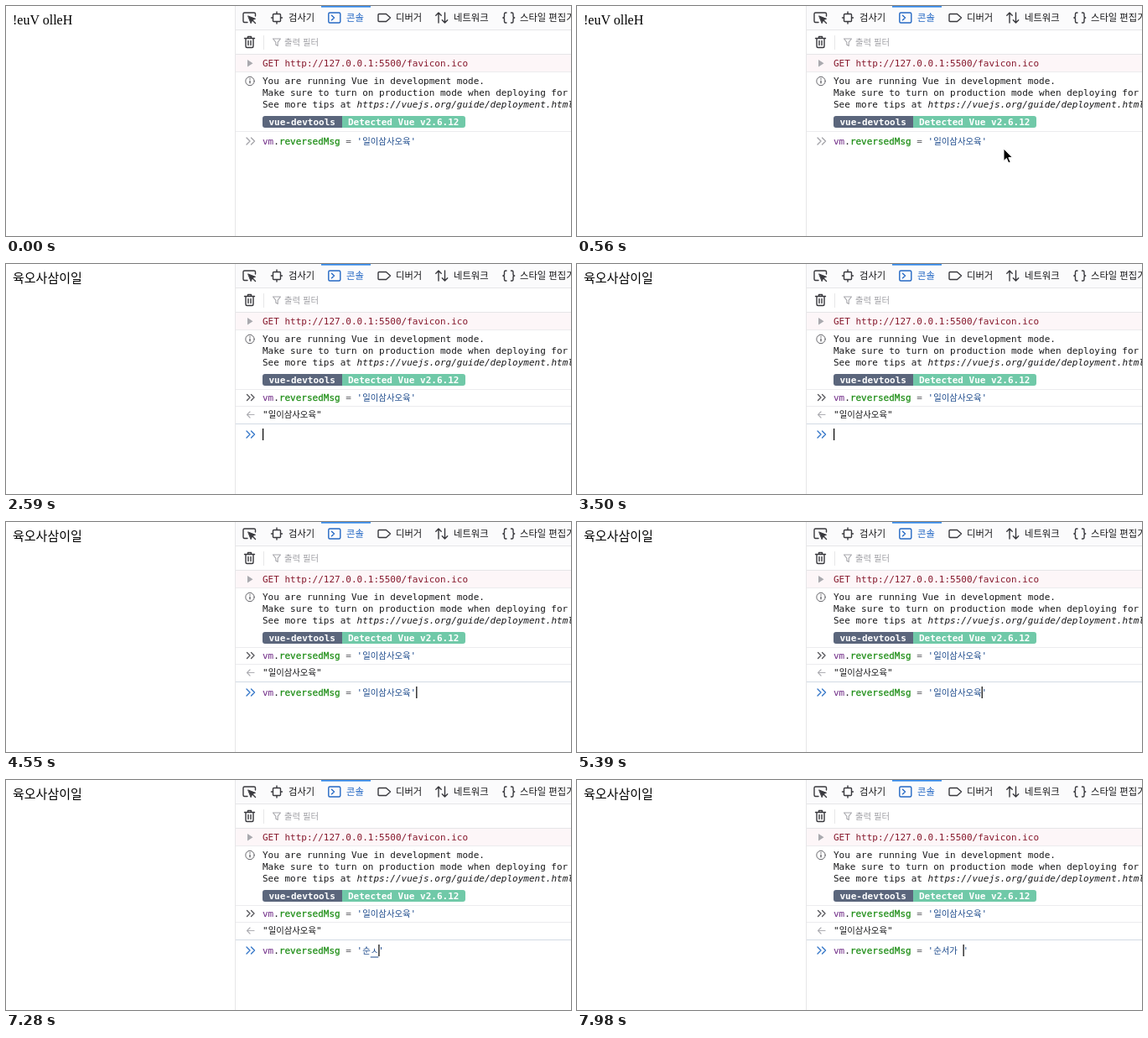
These frames come from a looping animation (674x274 px, 8000 ms). An HTML page:

```html
<!DOCTYPE html>
<html lang="ko">
<head>
<meta charset="utf-8">
<title>Console</title>
<style>
  html, body { margin: 0; width: 100%; height: 100%; overflow: hidden; background: #fff; }
  svg { display: block; width: 674px; height: 274px; }
  text { white-space: pre; }
  .mono { font: 11px "DejaVu Sans Mono", monospace; fill: #18181a; }
  .ko { font-family: "Noto Sans CJK KR", "Noto Sans CJK JP", "Noto Sans CJK", sans-serif; }
  .tab { font-size: 11.3px; fill: #18181a; }
  .mono .ko { font-size: 10.4px; }
  .badge { font-weight: bold; fill: #fff; }
  .var { fill: #6f2a86; }
  .prop { fill: #23901b; stroke: #23901b; stroke-width: .3px; }
  .op { fill: #5c5c61; }
  .str { fill: #1c4a8c; }
  .icon { fill: none; stroke: #38383d; stroke-width: 1.4; stroke-linejoin: round; stroke-linecap: round; }
  .rule { stroke: #e6e6e8; stroke-width: 1; }
</style>
</head>
<body>
<svg viewBox="0 0 674 274">
  <rect width="674" height="274" fill="#fff"/>
  <text id="page" x="8" y="22"></text>

  <rect x="274" width="400" height="28" fill="#fbfbfc"/>
  <rect x="274" y="58" width="400" height="20" fill="#fdf6f8"/>
  <path class="rule" d="M273.5 0V274M274 28.5H674M274 57.5H674M307.5 35V52"/>
  <path class="rule" stroke-opacity=".75" d="M274 78.5H674M274 149.5H674"/>
  <rect x="376" width="59" height="1.6" fill="#2f86ea"/>

  <g class="icon">
    <path d="M288 19.5H284.5Q283 19.5 283 18V9.500Q283 8 284.500 8H296Q297.500 8 297.500 9.500V12"/>
    <path d="M289 12L297.500 15.300L293.800 16.600L292.300 20.300Z" fill="#38383d" stroke-width="1"/>
    <path d="M294 17L297.500 20.500"/>
    <rect x="318.500" y="9.500" width="9" height="9" rx="1"/>
    <path d="M323 7V9M323 19V21M316.500 14H318M328 14H329.500"/>
    <g stroke="#2468c4">
      <rect x="384.800" y="8" width="14" height="12" rx="1.500"/>
      <path d="M388.500 11.300L391.500 14L388.500 16.700"/>
    </g>
    <path d="M445 9.500H453.500L458.500 14L453.500 18.500H445Q444 18.500 444 17.500V10.500Q444 9.500 445 9.500Z"/>
    <path d="M516 20V8M512.800 11.200L516 8L519.200 11.200M523.500 8V20M520.300 16.800L523.500 20L526.700 16.800"/>
    <path d="M597 8H596Q594.500 8 594.500 9.500V12Q594.500 14 592.800 14Q594.500 14 594.500 16V18.500Q594.500 20 596 20H597M602.500 8H603.500Q605 8 605 9.500V12Q605 14 606.700 14Q605 14 605 16V18.500Q605 20 603.500 20H602.500"/>
    <path d="M284.500 38.500H296.500M288.500 38V36.500H292.500V38M286 39V48Q286 49.500 287.500 49.500H293.500Q295 49.500 295 48V39M289 41.500V46.500M292 41.500V46.500"/>
    <path d="M318.500 39H327.500L324.200 43.200V47.500L321.800 46V43.200Z" stroke="#a8a8ad" stroke-width="1.100"/>
  </g>

  <g class="ko tab">
    <text x="337" y="17.500">검사기</text>
    <text x="406" y="17.500" style="fill:#2468c4">콘솔</text>
    <text x="465" y="17.500">디버거</text>
    <text x="534" y="17.500">네트워크</text>
    <text x="613" y="17.500">스타일 편집기</text>
    <text x="332" y="47" style="font-size:10.400px;fill:#a2a2a7">출력 필터</text>
  </g>

  <path d="M288 64L294.500 68.300L288 72.500Z" fill="#a9a9ae"/>
  <circle class="icon" cx="291" cy="89.500" r="5.200" style="stroke-width:1;stroke:#66666b"/>
  <path d="M291 88.800V92.300M291 86.300V87.500" stroke="#55555a" stroke-width="1.300"/>

  <g class="mono">
    <text x="306" y="72" style="fill:#86182c">GET http://127.0.0.1:5500/favicon.ico</text>
    <text x="306" y="93">You are running Vue in development mode.</text>
    <text x="306" y="107">Make sure to turn on production mode when deploying for production.</text>
    <text x="306" y="121">See more tips at <tspan font-style="italic">https://vuejs.org/guide/deployment.html</tspan></text>
    <path d="M401 131H309Q306 131 306 134V142Q306 145 309 145H401Z" fill="#5b667c"/>
    <path d="M401 131H545Q548 131 548 134V142Q548 145 545 145H401Z" fill="#70c9a8"/>
    <text class="badge" x="313.500" y="142">vue-devtools</text>
    <text class="badge" x="408" y="142">Detected Vue v2.6.12</text>
  </g>

  <g id="result" class="mono">
    <path class="rule" stroke-opacity=".75" d="M274 169.500H674"/>
    <path class="rule" d="M274 190.500H674" style="stroke:#d3dbe4"/>
    <path class="icon" d="M287.500 155.500L291 159L287.500 162.500M292.500 155.500L296 159L292.500 162.500" style="stroke:#55555a"/>
    <text id="echo" x="306" y="163"></text>
    <path class="icon" d="M296 179.500H287.500M291 176L287.500 179.500L291 183" style="stroke:#aeaeb3;stroke-width:1.200"/>
    <text x="306" y="183">"<tspan class="ko">일이삼사오육</tspan>"</text>
  </g>

  <g id="prompt" class="mono">
    <path id="chevron" class="icon" d="M287 -8L291 -4L287 0M292.500 -8L296.500 -4L292.500 0"/>
    <text id="input" x="306" y="0"></text>
    <path id="underline" stroke="#1c4a8c" stroke-width="1"/>
    <rect id="caret" y="-11" width="1.200" height="14" fill="#000"/>
  </g>

  <path id="mouse" d="M0 0V14.500L3.400 11.400L5.800 17L8.200 16L5.800 10.600H10.400Z" fill="#000" stroke="#fff" stroke-width="1"/>
</svg>
<script>
const LOOP = 8000, CLICK = 950, HIDE = 1650, ENTER = 2310, BLINK = 500;
const WORD = '일이삼사오육';
const MONO = 6.622, KO = 9.57, LEFT = 306;
const $ = id => document.getElementById(id);

// Each edit: time, string body (null for an empty line), caret after closing quote, composing
const edits = [
  [0, WORD, true], [CLICK, WORD, true], [ENTER, null], [4550, WORD, true], [5180, WORD]
];
for (let i = 1; i <= 6; i++) edits.push([5700 + i * 110, WORD.slice(0, 6 - i)]);
['ㅅ', '수', '순', '순ㅅ', '순서', '순서ㄱ', '순서가'].forEach((s, i) =>
  edits.push([6720 + i * 155, s, false, true]));
edits.push([7840, '순서가 ']);

const code = body => body === null ? '' :
  '<tspan class="var">vm</tspan>.<tspan class="prop">reversedMsg</tspan>' +
  '<tspan class="op"> = </tspan><tspan class="str">\'<tspan class="ko">' + body.trim() +
  '</tspan>' + (body.endsWith(' ') ? ' ' : '') + "'</tspan>";

const widthOf = body => [...body].reduce((w, c) => w + (c === ' ' ? MONO : KO), 0);

const show = (id, on) => $(id).setAttribute('visibility', on ? 'visible' : 'hidden');

function setPage(text, size, family) {
  const el = $('page');
  if (el.textContent === text) return;
  el.textContent = text;
  el.style.font = size + 'px ' + family;
}

let shown = null;
function drawPrompt(t) {
  const edit = edits.filter(e => e[0] <= t).pop();
  const [at, body, atEnd, composing] = edit;
  if (shown !== edit) {
    shown = edit;
    $('input').innerHTML = code(body);
  }
  const end = body === null ? LEFT : LEFT + 18 * MONO + widthOf(body);
  $('caret').setAttribute('x', end + (atEnd ? MONO : 0));
  show('caret', t >= CLICK && Math.floor((t - at) / BLINK) % 2 === 0);
  $('underline').setAttribute('d', composing ? `M${end - KO} 4H${end}` : '');
  $('chevron').style.stroke = t < CLICK ? '#a5a5aa' : '#3577c9';
  $('prompt').setAttribute('transform', `translate(0 ${t < ENTER ? 165 : 207})`);
}

function drawMouse(t) {
  show('mouse', t >= 70 && t < HIDE);
  const left = Math.pow(1 - Math.min(1, Math.max(0, (t - 70) / 490)), 2);
  $('mouse').setAttribute('transform', `translate(${509 + 161 * left} ${170 + 75 * left})`);
}

function draw(now) {
  const t = now % LOOP;
  if (t < ENTER) setPage('!euV olleH', 16, '"Liberation Serif", serif');
  else setPage('육오사삼이일', 15, '"Noto Sans CJK KR", "Noto Sans CJK JP", "Noto Sans CJK", sans-serif');
  show('result', t >= ENTER);
  drawPrompt(t);
  drawMouse(t);
}

$('echo').innerHTML = code(WORD);
const start = performance.now();
function tick() {
  draw(performance.now() - start);
  requestAnimationFrame(tick);
}
tick();
</script>
</body>
</html>
```
